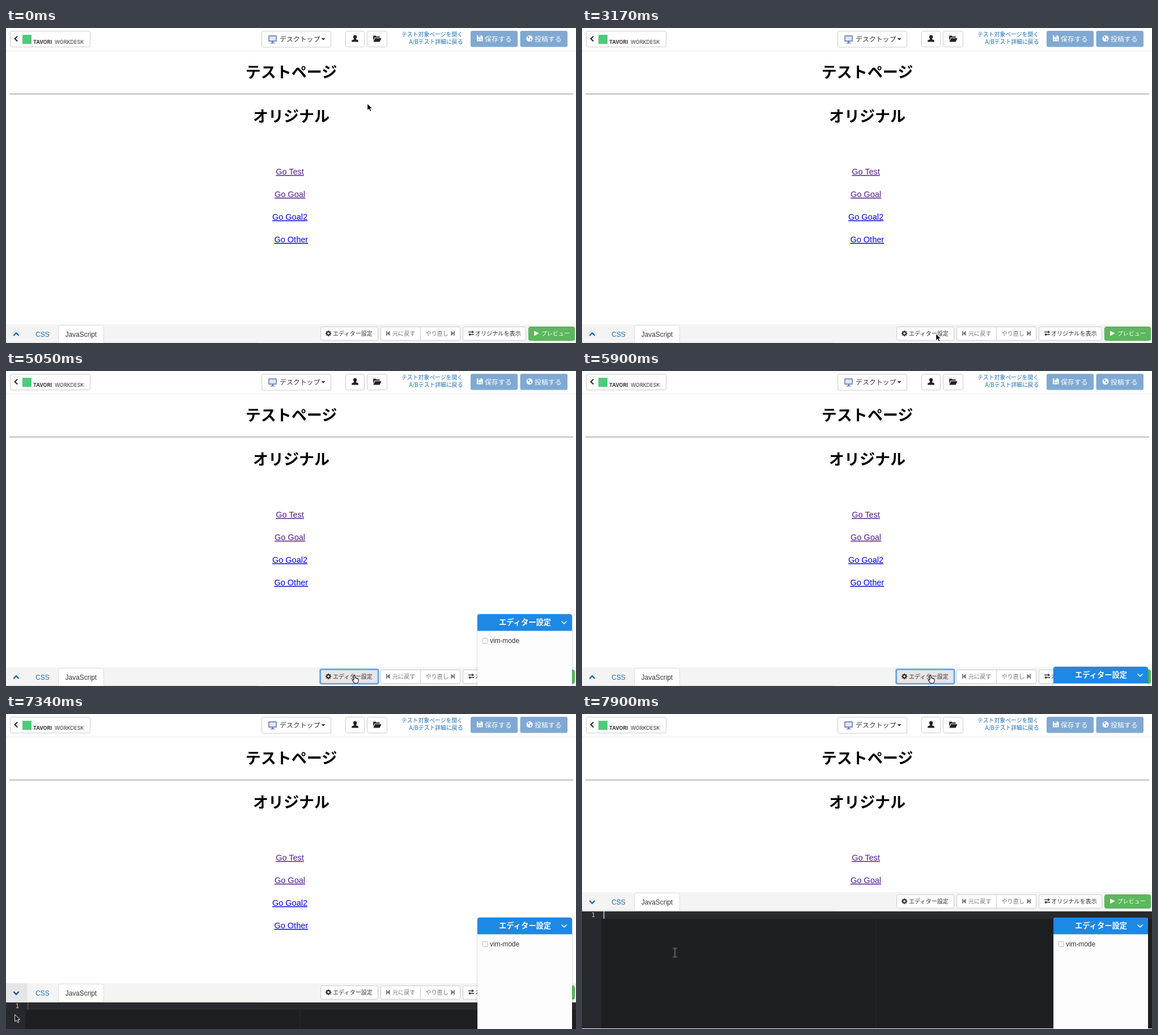
These frames come from a looping animation (1006 by 557 pixels, 8000 ms). An HTML page:

```html
<!DOCTYPE html>
<html lang="ja">
<head>
<meta charset="utf-8">
<title>Editor settings</title>
<style>
html, body { margin: 0; width: 100%; height: 100%; overflow: hidden; background: #fff; }
svg { display: block; width: 1006px; height: 557px; }
text { font-family: "Noto Sans CJK JP", "Noto Sans CJK", sans-serif; font-size: 10.1px; fill: #333; }
.latin { font-family: "Liberation Sans", sans-serif; font-size: 11.85px; }
.mid { text-anchor: middle; }
.h1 { font-size: 27px; font-weight: 700; fill: #000; text-anchor: middle; }
.link { font-family: "Liberation Sans", sans-serif; font-size: 14.5px; fill: #00e; text-anchor: middle; text-decoration: underline; }
.seen { fill: #551a8b; }
.brand { font-family: Inter, sans-serif; font-size: 9px; }
.big { font-size: 11.9px; }
.small { font-size: 9.85px; }
.title { font-size: 13.3px; font-weight: 700; }
.num { font-family: "DejaVu Sans Mono", monospace; font-size: 10.5px; fill: #d5d8d6; }
.blue { fill: #1c6fb8; }
.white { fill: #fff; }
.grey { fill: #777; }
.strong { font-weight: 500; }
.btn { fill: #fff; stroke: #ccc; }
.line { fill: none; stroke-linecap: butt; }
</style>
</head>
<body>
<svg viewBox="0 0 1006 557">
  <defs>
    <filter id="shade" x="-10%" y="-10%" width="120%" height="120%">
      <feDropShadow dx="0" dy="0" stdDeviation="1.6" flood-color="#000" flood-opacity=".28"/>
    </filter>
  </defs>
  <rect width="1006" height="557" fill="#fff"/>

  <g id="header">
    <path class="line" d="M0 40.5H1006" stroke="#ededed"/>
    <rect class="btn" x="7.5" y="5.5" width="141" height="28" rx="3"/>
    <path class="line" d="M20.2 14.5L15.6 19L20.2 23.5" stroke="#333" stroke-width="2.2"/>
    <rect x="29" y="12" width="16" height="16" fill="#4ccb7a"/>
    <text class="brand" x="48" y="27.5" font-weight="700">TAVORI</text>
    <text class="brand" x="86" y="27.5">WORKDESK</text>

    <rect class="btn" x="451.5" y="5.5" width="122" height="28.5" rx="3"/>
    <rect x="463.8" y="13.8" width="13.4" height="9.4" rx="1" fill="#dfe6f5" stroke="#7080b8" stroke-width="1.7"/>
    <path d="M469 24h3v2h2.5v1.3h-8V26h2.5z" fill="#7080b8"/>
    <text class="big" x="483" y="24">デスクトップ</text>
    <path d="M556.5 18h7l-3.5 3.8z" fill="#333"/>

    <rect class="btn" x="599.5" y="5.5" width="33" height="28" rx="3"/>
    <path d="M616 12.6c2.3 0 3.4 1.7 3.1 3.8c-.2 1.3-.8 2-1.2 2.5v1.2c1.6.7 3.8 1.2 4 2.5v1.9h-11.8v-1.9c.2-1.3 2.4-1.8 4-2.5v-1.2c-.4-.5-1-1.2-1.2-2.5c-.3-2.1.8-3.8 3.1-3.8z" fill="#222"/>
    <rect class="btn" x="637.5" y="5.5" width="35" height="28" rx="3"/>
    <path d="M648 22.5V14.5q0-1 1-1h3.5l1.2 1.4h5q1 0 1 1v1h-8.3q-1 0-1.5 1zM648.3 24.5l2.6-5.8q.3-.8 1.2-.8h10.4l-2.6 5.8q-.4.8-1.2.8z" fill="#222"/>

    <text class="small blue" x="698" y="14.6">テスト対象ページを開く</text>
    <text class="small blue" x="806.5" y="28.2" text-anchor="end">A/Bテスト詳細に戻る</text>

    <rect x="820" y="5" width="83" height="28.5" rx="3" fill="#7fa9d3"/>
    <path d="M831 13h8.5l2 2v8.500h-10.5z" fill="#fff"/>
    <path d="M833.3 13h4.8v3.4h-4.8zM833 19h6.5v4.5h-6.5z" fill="#7fa9d3"/>
    <path d="M836.3 13.4h1.2v2.4h-1.2zM833.8 20h4.9v3.5h-4.9z" fill="#fff"/>
    <text class="big white strong" x="845" y="23.5">保存する</text>
    <rect x="907.5" y="5" width="83.5" height="28.5" rx="3" fill="#7fa9d3"/>
    <circle cx="924" cy="18.6" r="5.5" fill="#fff"/>
    <path d="M920.5 15.5l2.5-1.2l1.5 1.6l-1.7 1.2l.4 1.4l-1.6.3zM924.5 18.5l3.3.4l-1 2.7l-1.8 1.2z" fill="#7fa9d3"/>
    <text class="big white strong" x="933" y="23.5">投稿する</text>
  </g>

  <g id="page">
    <text class="h1" x="503.5" y="87.7">テストページ</text>
    <path class="line" d="M6 116.5H1001" stroke="#999"/>
    <path class="line" d="M6 117.5H1001" stroke="#e4e4e4"/>
    <text class="h1" x="503.5" y="165.7">オリジナル</text>
    <text class="link seen" x="501" y="259">Go Test</text>
    <text class="link seen" x="501" y="299">Go Goal</text>
    <text class="link" x="501" y="339">Go Goal2</text>
    <text class="link" x="503.3" y="379">Go Other</text>
  </g>

  <g id="dock">
    <rect y="524" width="1006" height="34" fill="#f4f4f4"/>
    <rect id="toggleBg" y="524" width="38" height="32" fill="#e5e6e8"/>
    <path class="line" d="M0 556.5H444" stroke="#ddd"/>
    <path d="M92.5 557V529.5q0-4 4-4h72q4 0 4 4V557z" fill="#fff" stroke="#ddd"/>
    <path id="toggle" class="line" stroke-width="2.4"/>
    <text class="latin mid blue" x="64.5" y="546">CSS</text>
    <text class="latin mid" x="132.5" y="546">JavaScript</text>

    <rect id="settings" class="btn" x="555.5" y="528.5" width="101" height="24" rx="3"/>
    <rect id="ring" x="554.5" y="527.5" width="102.5" height="25.5" rx="2.5" fill="none" stroke="#5ea3e8" stroke-width="2.6"/>
    <g id="gear" transform="translate(569 540)"></g>
    <text x="577" y="543.5">エディター設定</text>

    <rect class="btn" x="661.5" y="528.5" width="140" height="24" rx="3"/>
    <path class="line" d="M731.5 528.5v24" stroke="#ccc"/>
    <path class="grey" d="M671 536h1.8v3.4l4.7-3.8v8.8l-4.7-3.8v3.4h-1.8z"/>
    <text class="grey" x="682" y="543.5">元に戻す</text>
    <text class="grey" x="740.5" y="543.5">やり直し</text>
    <path class="grey" d="M792 536h-1.8v3.4l-4.7-3.8v8.8l4.7-3.8v3.4h1.8z"/>

    <rect class="btn" x="806.5" y="528.5" width="111" height="24" rx="3"/>
    <path d="M816 536.7h6.5v-2l3.5 2.8l-3.5 2.8v-2H816zM826 541.2h-6.5v-2l-3.5 2.8l3.5 2.8v-2h6.5z" fill="#333"/>
    <text x="828" y="543.5">オリジナルを表示</text>
    <rect x="922.5" y="528.5" width="81" height="24" rx="3" fill="#5cb85c" stroke="#4cae4c"/>
    <path d="M932 535.5l8.8 4.5l-8.8 4.5z" fill="#fff"/>
    <text class="white strong" x="944.5" y="543.5">プレビュー</text>

    <rect y="558" width="1006" height="207" fill="#1d1f21"/>
    <rect y="558" width="34" height="207" fill="#25282c"/>
    <rect y="558" width="1006" height="13" fill="#282a2e"/>
    <path class="line" d="M519.5 558v207" stroke="#282b2e"/>
    <text class="num" x="16.7" y="568">1</text>
    <rect id="caret" x="38" y="558" width="1.3" height="13"/>
  </g>

  <g id="panel">
    <path d="M832 220V4q0-4 4-4H995q4 0 4 4V220z" fill="#fdfdfd" filter="url(#shade)"/>
    <path d="M832 29.5V4q0-4 4-4H995q4 0 4 4V29.5z" fill="#1e88e5"/>
    <text class="title mid white" x="916" y="19">エディター設定</text>
    <path class="line" d="M980.5 12.5l4.5 4.5l4.5-4.5" stroke="#fff" stroke-width="1.5"/>
    <rect x="841" y="42.5" width="9" height="9" rx="2" fill="#fff" stroke="#bbb"/>
    <text class="latin" x="854" y="50.6">vim-mode</text>
  </g>

  <g id="pointer">
    <path id="arrow" d="M.7.5V12.8L3.6 10.1L5.7 14.6L7.9 13.6L5.8 9.3H9.6Z" fill="#000" stroke="#fff" stroke-linejoin="round"/>
    <path id="hand" d="M-1.2.8Q0-.8 1.2.8V5.2Q2.4 4.2 3.3 5.6Q4.6 4.8 5.3 6.2Q7 5.8 7 7.5V10Q6.7 12 5.7 14H-.2Q-1.5 11.5-3.7 8.8Q-4.2 7-2.7 7.2L-1.2 8.6Z" fill="#fff" stroke="#111" stroke-width="1.1" stroke-linejoin="round"/>
    <g id="beam" class="line">
      <path d="M-3.5-7.5h2.5l1 1l1-1h2.5M0-6.5v14M-3.5 7.5h2.5l1-1l1 1h2.5M-2 2.5h4" stroke="#8b8d90" stroke-width="2.2"/>
      <path d="M-3-7.5h2l1 1l1-1h2M0-6.5v14M-3 7.5h2l1-1l1 1h2M-2 2.5h4" stroke="#1d1f21" stroke-width=".9"/>
    </g>
  </g>
</svg>
<script>
const LOOP = 8000;
const $ = id => document.getElementById(id);
const set = (id, name, value) => $(id).setAttribute(name, value);
const show = (id, on) => set(id, 'visibility', on ? 'visible' : 'hidden');
const shift = (id, x, y) => set(id, 'transform', `translate(${x.toFixed(1)} ${y.toFixed(1)})`);

const ticks = [0, 1260, 1440, 1520, 1790, 1880, 1970, 2140, 2230, 2310, 2400, 2580, 2670,
  3530, 3620, 3980, 4100, 4180, 4300, 4930, 5050, 5160, 5280,
  5810, 5910, 6000, 6100, 6190, 6290, 6390, 6490,
  6670, 6770, 6860, 6960, 7050, 7150, 7250, 7340, 7490, 7600, 7900];

// Pointer stops: time, x, y
const stops = [
  [1170, 637, 133], [1260, 637, 140], [1350, 637, 140], [1520, 630, 371],
  [1700, 630, 371], [1970, 624, 457], [2050, 624, 457], [2400, 624, 523],
  [2490, 624, 523], [2670, 624, 540], [3440, 624, 540], [3530, 615, 538],
  [6100, 615, 538], [6490, 88, 486], [6580, 88, 486], [6960, 15, 531],
  [7400, 15, 531], [7600, 164, 422]
];

const clamp = p => Math.max(0, Math.min(1, p));
const swing = p => (1 - Math.cos(Math.PI * clamp(p))) / 2;
const slide = (t, start) => swing((t - start) / 400);

function pointerAt(t) {
  const i = stops.findIndex(s => s[0] >= t);
  if (i === 0) return stops[0].slice(1);
  if (i < 0) return stops[stops.length - 1].slice(1);
  const [t0, x0, y0] = stops[i - 1], [t1, x1, y1] = stops[i];
  const p = swing((t - t0) / (t1 - t0));
  return [x0 + (x1 - x0) * p, y0 + (y1 - y0) * p];
}

function drawGear() {
  let d = '';
  for (let i = 0; i < 32; i++) {
    const a = (i - .5) * Math.PI / 16, r = i % 4 < 2 ? 5.3 : 3.9;
    d += `${i ? 'L' : 'M'}${(r * Math.cos(a)).toFixed(2)} ${(r * Math.sin(a)).toFixed(2)}`;
  }
  $('gear').innerHTML = `<path d="${d}ZM1.8 0A1.8 1.8 0 1 0 -1.8 0A1.8 1.8 0 1 0 1.8 0Z" fill="#333" fill-rule="evenodd"/>`;
}

function render(time) {
  const t = ticks.filter(k => k <= time).pop();
  const within = (a, b) => t >= a && t < b;

  const open = slide(t, 3880) - slide(t, 4888) + slide(t, 5700);
  shift('panel', 0, Math.round(557 - 196.7 * open));
  show('panel', open > .01);

  shift('dock', 0, -Math.round(209 * slide(t, 7213)));
  const expanded = t >= 7250, hover = within(6860, 7490);
  show('toggleBg', hover);
  set('toggle', 'd', expanded ? 'M13.3 539l4.7 4.7l4.7-4.7' : 'M13.3 544l4.7-4.7l4.7 4.7');
  set('toggle', 'stroke', hover ? '#23527c' : '#1c6fb8');

  const pressed = within(3530, 7050);
  show('ring', within(3980, 7050));
  $('settings').style.fill = pressed ? '#e6e6e6' : '#fff';
  $('settings').style.stroke = pressed ? '#adadad' : '#ccc';
  set('caret', 'fill', t >= 7900 ? '#e8e8e8' : within(7250, 7490) ? '#55585c' : '#282a2e');

  const [x, y] = pointerAt(t);
  shift('pointer', x, y);
  const hand = within(3530, 6190) || within(6860, 7340), beam = t >= 7490;
  show('hand', hand);
  show('beam', beam);
  show('arrow', !hand && !beam);
}

drawGear();
render(0);
let begin;
function loop(now) {
  begin ??= now;
  render((now - begin) % LOOP);
  requestAnimationFrame(loop);
}
requestAnimationFrame(loop);
</script>
</body>
</html>
```
